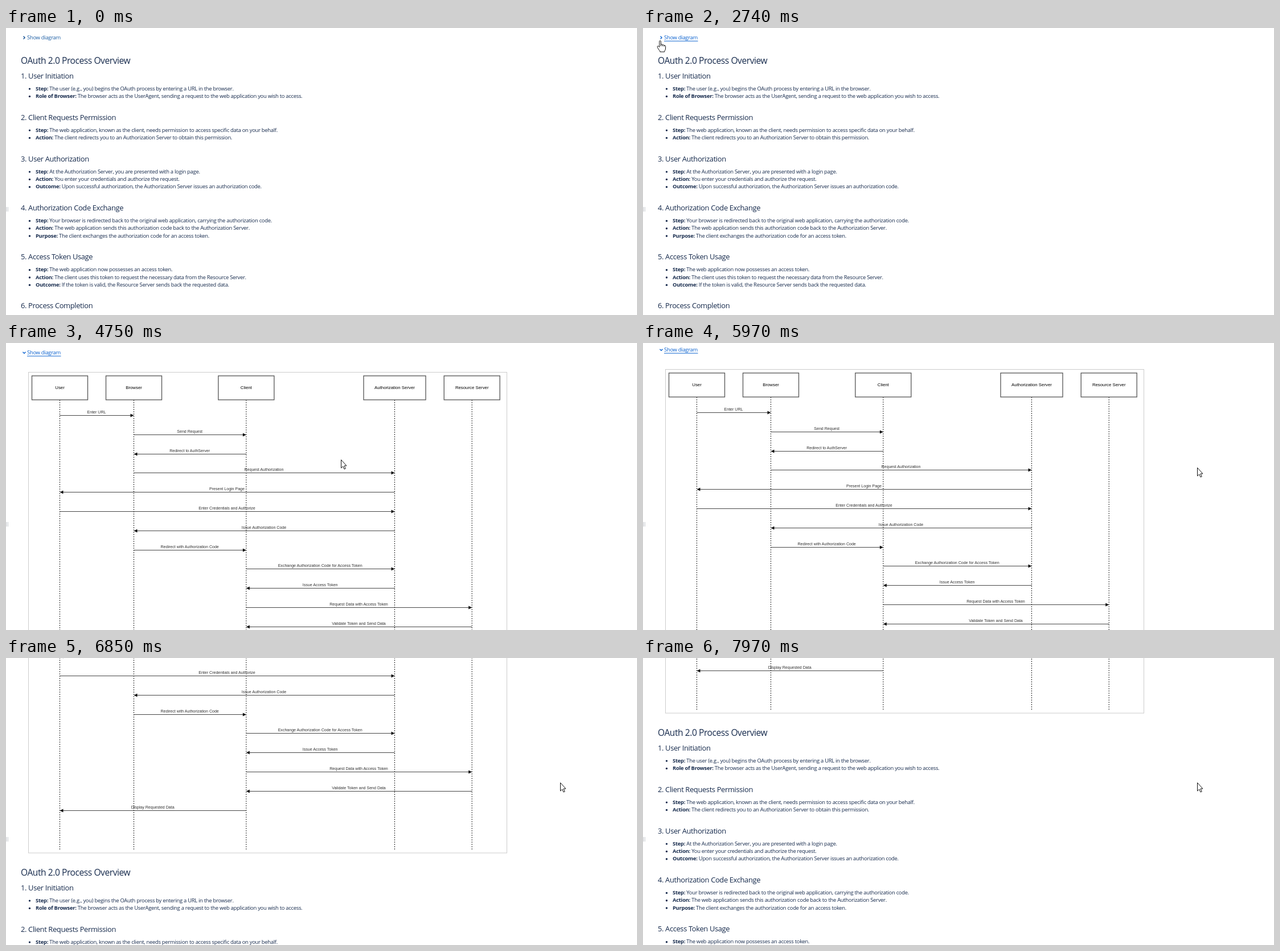
Recreate the animation shown at these times as an HTML page. Size 1108 by 505 pixels, loop 8 s.

```html
<!DOCTYPE html>
<html lang="en">
<head>
<meta charset="utf-8">
<title>OAuth 2.0 Process Overview</title>
<style>
html, body { margin: 0; width: 100%; height: 100%; overflow: hidden; background: #fff; }
svg { display: block; }
text { font-family: "Open Sans", "Noto Sans", sans-serif; font-size: 9.37px; letter-spacing: -.027em; fill: #172b4d; }
.title { font-size: 15.55px; }
.head { font-size: 12.9px; }
.bold { font-weight: 700; }
#diagram text { font-family: "Liberation Sans", Arial, sans-serif; font-size: 7.06px; letter-spacing: 0; text-anchor: middle; fill: #333; }
#diagram .actor { font-size: 7.82px; fill: #000; }
</style>
</head>
<body>
<svg width="1108" height="505" viewBox="0 0 1108 505">
  <g id="page">
    <path id="chevron" fill="none" stroke-width="1.4"/>
    <text id="link" x="37" y="20.3">Show diagram</text>
    <path id="underline" d="M37 23H96.5" stroke="#0b62cf"/>
    <g id="diagram"></g>
    <g id="article"></g>
  </g>
  <path d="M.7 315v8M3.3 315v8" stroke="#c4c7cc"/>
  <g id="cursor" fill="#fff" stroke="#111" stroke-linejoin="round">
    <path id="arrow" d="M.5.5V15L3.8 12 6 17 8.2 16 6 11H10Z"/>
    <path id="hand" d="M-1.2 1.2Q0-.8 1.4 1.2V7Q3 6 4.2 7.6 5.8 6.8 7 8.6 9.4 8 9.6 10.4V14Q9.4 17 7.8 18.6V20H-.2V18.6Q-2.4 16.4-4.4 12.6-5.6 10-3.8 9.6-2.4 9.8-1.2 11.6ZM1.4 7v3M4.2 7.6v2.6M7 8.6v2"/>
  </g>
</svg>
<script>
const $ = id => document.getElementById(id);
const LOOP = 8000, NOTCH = 88.5, OPEN = 3170, HOVER = 2300, SHIFT = 585;

const sections = [
  ["User Initiation",
    "Step: The user (e.g., you) begins the OAuth process by entering a URL in the browser.",
    "Role of Browser: The browser acts as the UserAgent, sending a request to the web application you wish to access."],
  ["Client Requests Permission",
    "Step: The web application, known as the client, needs permission to access specific data on your behalf.",
    "Action: The client redirects you to an Authorization Server to obtain this permission."],
  ["User Authorization",
    "Step: At the Authorization Server, you are presented with a login page.",
    "Action: You enter your credentials and authorize the request.",
    "Outcome: Upon successful authorization, the Authorization Server issues an authorization code."],
  ["Authorization Code Exchange",
    "Step: Your browser is redirected back to the original web application, carrying the authorization code.",
    "Action: The web application sends this authorization code back to the Authorization Server.",
    "Purpose: The client exchanges the authorization code for an access token."],
  ["Access Token Usage",
    "Step: The web application now possesses an access token.",
    "Action: The client uses this token to request the necessary data from the Resource Server.",
    "Outcome: If the token is valid, the Resource Server sends back the requested data."],
  ["Process Completion"]
];

function buildArticle() {
  let svg = '<text class="title" x="26" y="63">OAuth 2.0 Process Overview</text>', y = 84;
  sections.forEach(([head, ...items], i) => {
    svg += `<text class="head" x="26" y="${y + 4.5}">${i + 1}. ${head}</text>`;
    items.forEach((item, k) => {
      const iy = y + 22.3 + 13.3 * k, cut = item.indexOf(":") + 1;
      svg += `<circle cx="41.5" cy="${iy + .8}" r="1.7" fill="#172b4d"/>
        <text x="52" y="${iy + 3.4}"><tspan class="bold">${item.slice(0, cut)}</tspan>${item.slice(cut)}</text>`;
    });
    y += 46.4 + 13.3 * items.length;
  });
  return svg;
}

// name, lifeline x, box width
const actors = [["User", 94.5, 98], ["Browser", 224.5, 98], ["Client", 421.8, 98],
  ["Authorization Server", 682.5, 109], ["Resource Server", 818.2, 98]];
// label, sender, receiver
const messages = [["Enter URL", 0, 1], ["Send Request", 1, 2], ["Redirect to AuthServer", 2, 1],
  ["Request Authorization", 1, 3], ["Present Login Page", 3, 0], ["Enter Credentials and Authorize", 0, 3],
  ["Issue Authorization Code", 3, 1], ["Redirect with Authorization Code", 1, 2],
  ["Exchange Authorization Code for Access Token", 2, 3], ["Issue Access Token", 3, 2],
  ["Request Data with Access Token", 2, 4], ["Validate Token and Send Data", 4, 2], ["Display Requested Data", 2, 0]];

function buildDiagram() {
  let svg = '<rect x="39.5" y="51.5" width="840" height="556.5" fill="#fff" stroke="#ccc"/>';
  for (const [name, x, w] of actors)
    svg += `<path d="M${x} 100V602" stroke="#222" stroke-dasharray="2 2"/>
      <rect x="${x - w / 2}" y="57.8" width="${w}" height="42.2" fill="#fff" stroke="#555" stroke-width="1.3"/>
      <text class="actor" x="${x}" y="81.2">${name}</text>`;
  messages.forEach(([label, from, to], i) => {
    const a = actors[from][1], b = actors[to][1], y = Math.round(126.9 + 33.82 * i) + .5, d = Math.sign(b - a);
    svg += `<path d="M${a} ${y}H${b - 5 * d}" stroke="#333" stroke-width=".9"/>
      <path d="M${b} ${y}l${-6 * d}-3v6z" fill="#111"/>
      <text x="${(a + b) / 2 - .5}" y="${y - 3.2}">${label}</text>`;
  });
  return svg;
}

// bursts of screen updates: start, end, count
const bursts = [[390, 1160, 12], [1230, 1970, 12], [2040, 2740, 11], [3030, 3820, 12], [3890, 4160, 5],
  [4620, 5370, 12], [5970, 6190, 4], [6380, 6520, 3], [6720, 6850, 3], [7240, 7710, 7], [7900, 7970, 2]];
// cursor track: time, x, y
const track = [[390, 848, 447], [740, 380, 296], [1160, 103, 172], [1490, 42, 116], [1970, 28, 47],
  [2740, 30, 22], [3600, 30, 22], [3890, 127, 72], [4160, 463, 198], [4550, 463, 198],
  [5100, 960, 227], [5370, 973, 219]];
const wheel = [5940, 6325, 6655, 7206, 7492, 7832];

const clamp = v => Math.min(1, Math.max(0, v));
const ease = p => p * p * (3 - 2 * p);

function lastUpdate(t) {
  const burst = bursts.findLast(b => b[0] <= t);
  if (!burst) return 0;
  const [start, end, count] = burst, gap = (end - start) / (count - 1);
  return start + gap * Math.min(count - 1, Math.floor((t - start) / gap + .001));
}

function cursorAt(t) {
  const next = track.findIndex(k => k[0] > t);
  if (next < 0) return track.at(-1).slice(1);
  const [t0, x0, y0] = track[next - 1], [t1, x1, y1] = track[next], p = (t - t0) / (t1 - t0);
  return [x0 + (x1 - x0) * p, y0 + (y1 - y0) * p];
}

const show = (id, on) => $(id).setAttribute("visibility", on ? "visible" : "hidden");

function draw(now) {
  const t = lastUpdate(now % LOOP), open = t >= OPEN, hover = t >= HOVER;
  const scroll = wheel.reduce((sum, start) => sum + NOTCH * ease(clamp((t - start) / 200)), 0);
  $("page").setAttribute("transform", `translate(0 ${-Math.round(scroll)})`);
  $("article").setAttribute("transform", `translate(0 ${open ? SHIFT : 0})`);
  $("diagram").setAttribute("opacity", clamp((t - OPEN + 70) / 460));
  show("diagram", open);
  show("underline", hover);
  $("chevron").setAttribute("d", open ? "M29.5 15.8 32 18.2 34.5 15.8" : "M30.6 14.6 33 17 30.6 19.4");
  $("chevron").setAttribute("stroke", hover ? "#0b62cf" : "#0b4a8f");
  $("link").style.fill = hover ? "#0b62cf" : "#1d5fa5";
  const visible = t >= track[0][0], pointing = hover && t <= 3600;
  show("arrow", visible && !pointing);
  show("hand", visible && pointing);
  if (visible) $("cursor").setAttribute("transform", `translate(${cursorAt(t).map(Math.round)})`);
  requestAnimationFrame(draw);
}

$("diagram").innerHTML = buildDiagram();
$("article").innerHTML = buildArticle();
requestAnimationFrame(draw);
</script>
</body>
</html>
```
